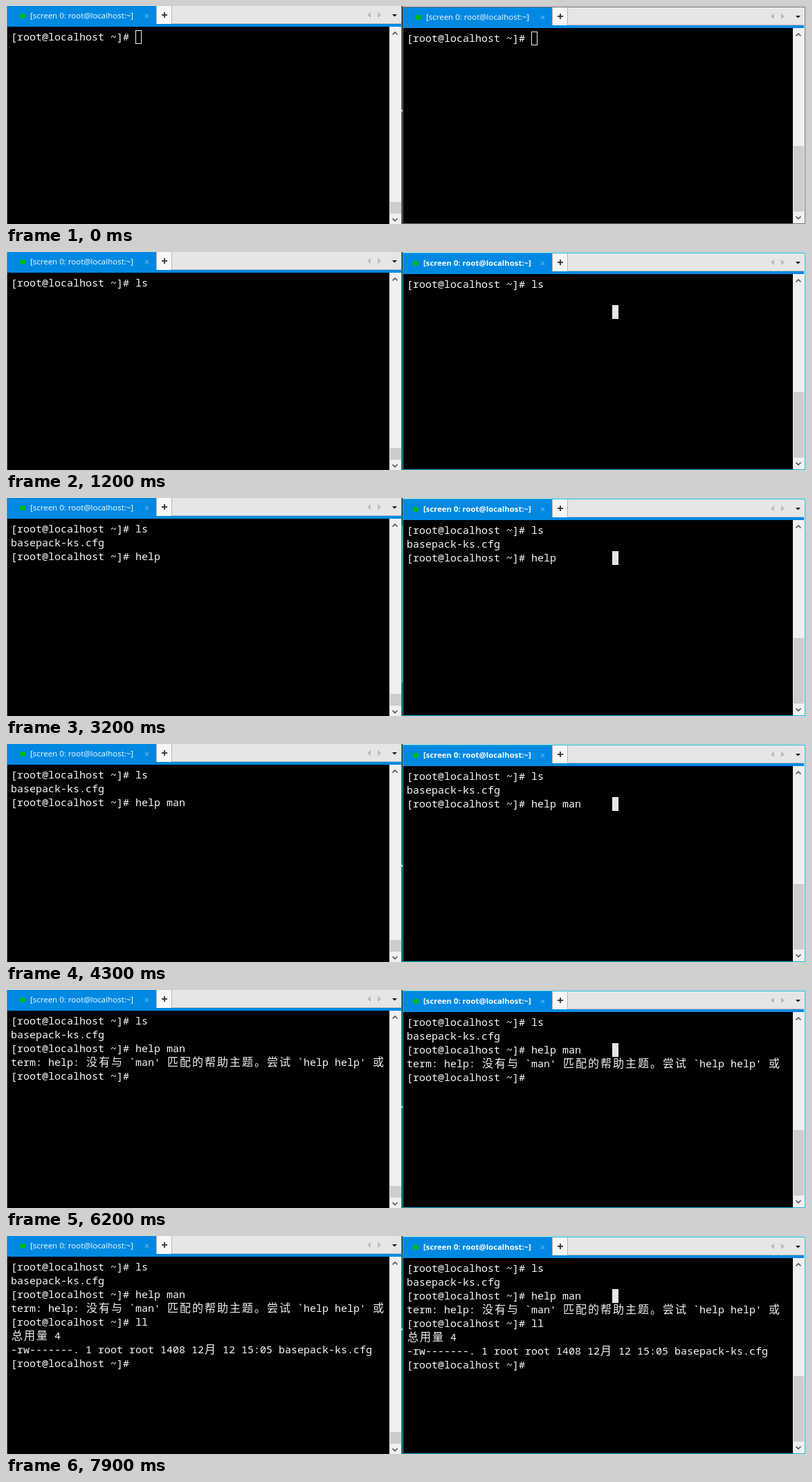
An HTML page that plays this animation: 1156x316 px, repeating every 8000 ms.

```html
<!DOCTYPE html>
<html lang="zh">
<head>
<meta charset="utf-8">
<title>Two synchronised terminals</title>
<style>
  html, body { margin: 0; width: 100%; height: 100%; overflow: hidden; background: #000; }
  svg { display: block; width: 1156px; height: 316px; }
  text { white-space: pre; }
  .mono { font: 15px "Noto Sans Mono", "DejaVu Sans Mono", monospace; fill: #fafafa; }
  .han { font: 16px "Noto Sans CJK SC", "Noto Sans CJK", sans-serif; letter-spacing: 2px; fill: #f0f0f0; }
  .tab { font: 11.5px "Open Sans", "Noto Sans", sans-serif; fill: #fff; }
  .tab.bold { font-size: 11.35px; font-weight: 700; }
</style>
</head>
<body>
<svg id="stage" viewBox="0 0 1156 316"></svg>
<script>
const LOOP = 8000, CELL = 9, ROW = 20;
const PROMPT = "[root@localhost ~]# ";
const FILE = "basepack-ks.cfg";

// [time, row, text]: a row keeps its text until its next entry
const script = [
  [0, 0, PROMPT],
  ...typing(0, [1100, "l"], [1200, "ls"]),
  [1500, 1, FILE],
  [1500, 2, PROMPT],
  ...typing(2, [2700, "h"], [2800, "he"], [3200, "help"],
    [4000, "help m"], [4100, "help ma"], [4300, "help man"]),
  [4600, 3, "term: help: 没有与 `man' 匹配的帮助主题。尝试 `help help' 或"],
  [4600, 4, PROMPT],
  ...typing(4, [7200, "l"], [7300, "ll"]),
  [7500, 5, "总用量 4"],
  [7500, 6, "-rw-------. 1 root root 1408 12月 12 15:05 " + FILE],
  [7500, 7, PROMPT]
];

// [time, y] of the small tick between the windows
const ticks = [[0, 150], [400, -9], [4300, 175], [6200, 168], [6400, 160],
  [6500, 154], [6600, 148], [7900, 134]];

const stage = document.getElementById("stage");
const timed = [];

function typing(row, ...steps) {
  return steps.map(([time, text]) => [time, row, PROMPT + text]);
}

function add(parent, tag, attrs = {}, text) {
  const node = document.createElementNS("http://www.w3.org/2000/svg", tag);
  for (const key in attrs) node.setAttribute(key, attrs[key]);
  if (text !== undefined) node.textContent = text;
  return parent.appendChild(node);
}

function rect(parent, x, y, width, height, fill) {
  return add(parent, "rect", { x, y, width, height, fill });
}

function path(parent, d, fill, stroke = "none", width = 1) {
  return add(parent, "path", { d, fill, stroke, "stroke-width": width });
}

function outline(parent, x, y, width, height, stroke) {
  return add(parent, "rect", { x: x + 0.5, y: y + 0.5, width: width - 1, height: height - 1, fill: "none", stroke });
}

function during(node, from, to = LOOP) {
  timed.push({ node, from, to });
  return node;
}

// Han characters take two cells, all others one
function line(parent, row, text) {
  const group = add(parent, "g");
  let col = 0;
  for (const run of text.match(/[\u3000-\u9fff]+|[^\u3000-\u9fff]+/g)) {
    const han = run.charCodeAt(0) >= 0x3000;
    add(group, "text", { class: han ? "han" : "mono", x: 7 + col * CELL + (han ? 1 : 0), y: 50 + row * ROW }, run);
    col += run.length * (han ? 2 : 1);
  }
  return group;
}

function label(parent, x, bold) {
  const group = add(parent, "g");
  add(group, "ellipse", { cx: x - 11, cy: 14.5, rx: 4.3, ry: 3.7, fill: "#08b818" });
  add(group, "text", { class: bold ? "tab bold" : "tab", x, y: 18 }, "[screen 0: root@localhost:~]");
  return group;
}

function pane(x, y, barX, barW, thumbY, thumbH, bottom) {
  const g = add(stage, "g", { transform: `translate(${x} ${y})` });
  const end = barX + barW, mid = barX + 8;
  rect(g, 2, 0, end - 2, 26, "#e6e6e6");
  rect(g, 217, 25, end - 217, 1, "#bcbcbc");
  rect(g, 2, 0, 215, 26, "#0089e3");
  rect(g, 218, 0, 22, 26, "#f7f7f7");
  path(g, "M217.5 0V26M239.5 0V26", "none", "#b4b4b4");
  path(g, "M225 13H233M229 9V17", "none", "#404040", 2);
  path(g, "M201 12l5 5M206 12l-5 5", "none", "#8fcdf5");
  path(g, `M${barX - 27} 8.5v9l-5 -4.5zM${barX - 17} 8.5v9l5 -4.5z`, "#bcbcbc");
  path(g, `M${barX + 4} 12h7l-3.5 3.5z`, "#111");
  rect(g, 2, 26, end - 2, 4, "#0089e3");
  rect(g, 2, 30, barX - 2, 286, "#000");
  rect(g, barX, 30, barW, 286, "#f0f0f0");
  rect(g, barX + 1, thumbY, barW - 1, thumbH, "#cdcdcd");
  path(g, `M${mid - 3.5} 41.5l3.5 -3.5l3.5 3.5M${mid - 3.5} ${bottom}l3.5 3.5l3.5 -3.5`, "none", "#555", 1.7);
  script.forEach(([time, row, text], i) => {
    const next = script.find((entry, j) => j > i && entry[1] === row);
    during(line(g, row, text), time, next ? next[0] : LOOP);
  });
  return g;
}

function caret(parent, until) {
  during(outline(parent, 187, 35, 9, 20, "#f4f4f4"), 0, until);
}

rect(stage, 0, 0, 1156, 316, "#dcdcdc");
rect(stage, 1, 0, 1, 316, "#8c8c8c");

const left = pane(0, 0, 554, 17, 284, 17, 308);
label(left, 35, false);
caret(left, 1100);

const right = pane(572, 2, 565, 16, 201, 95, 303);
during(label(right, 35, false), 0, 400);
during(label(right, 31, true), 400);
caret(right, 400);

// gap between the windows
rect(stage, 571, 0, 1, 316, "#8a8a8a");
rect(stage, 572, 0, 1, 316, "#1c1c1c");
during(rect(stage, 572, 40, 1, 228, "#6a7480"), 2300, 4000);

// window border, lit while the right window has focus
rect(stage, 1153, 2, 1, 313, "#f4f4f4");
during(outline(stage, 573, 1, 582, 315, "#6e6e6e"), 0, 400);
during(outline(stage, 573, 1, 582, 315, "#18b9d8"), 400);

const tick = rect(stage, 571, 0, 2, 3, "#c4c4c4");
const pointer = during(rect(stage, 876, 77, 9, 20, "#e6e6e6"), 400);

function draw(t) {
  for (const { node, from, to } of timed) {
    node.setAttribute("visibility", t >= from && t < to ? "visible" : "hidden");
  }
  const parked = t >= 1100;
  pointer.setAttribute("x", parked ? 876 : 895);
  pointer.setAttribute("y", parked ? 77 : 246);
  tick.setAttribute("y", ticks.filter(([time]) => time <= t).pop()[1]);
}

const start = performance.now();
function frame() {
  draw((performance.now() - start) % LOOP);
  requestAnimationFrame(frame);
}
draw(0);
requestAnimationFrame(frame);
</script>
</body>
</html>
```
